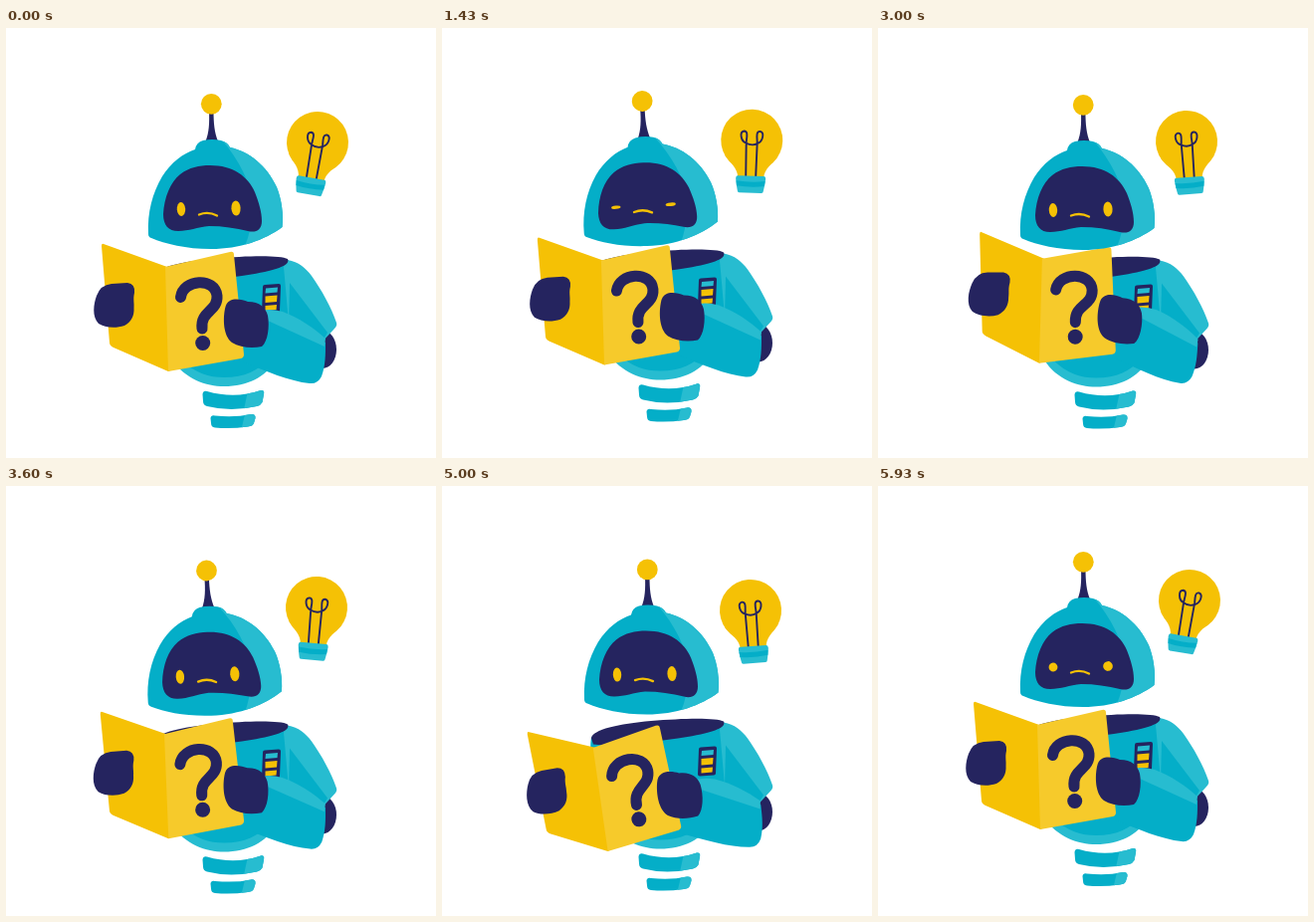
An HTML page with a canvas that plays this animation: 432x432 px, repeating every 6010 ms.

```html
<!DOCTYPE html>
<html lang="en">
<head>
<meta charset="utf-8">
<title>Robot reading</title>
<style>
html, body { margin: 0; width: 100%; height: 100%; overflow: hidden; background: #fff; }
canvas { display: block; width: 432px; height: 432px; }
</style>
</head>
<body>
<canvas id="stage" width="432" height="432"></canvas>
<script>
const ctx = document.getElementById('stage').getContext('2d');
const LOOP = 6010;
const TEAL = '#04aec8', LIGHT = '#27bcd0', NAVY = '#25245f';
const YELLOW = '#f5c105', PAGE = '#f6ca2b';

// Key poses as [seconds, value] pairs
const bodyY = [[0, 0], [2, -8], [4, 9], [6, 0]];
const headY = [[0, 0], [0.83, -0.3], [2.1, -6], [3, 1], [3.6, 8.5], [4, 9.5], [5, 7.6], [5.93, 0]];
const headTilt = [[0, 0], [0.75, -1.6], [2.1, -2.6], [2.95, 0], [3.6, -2], [4.6, 0]];
const armTilt = [[0, 0], [0.75, -3.7], [1.35, 0.3], [2, -3.6], [2.95, -3.3], [3.6, 0.7], [4.1, 0.4], [5, 6.5], [5.93, 0]];
const bulbY = [[0, 0], [0.83, 2], [2.1, -7], [3, -1], [3.6, 7], [4.2, 9.5], [5, 10], [5.93, 0]];
const eyeOpen = [[0, 1], [0.3, 1], [0.5, 0.28], [0.85, 0.28], [2.1, 0.18], [2.2, 0.18], [2.45, 1], [5.8, 1], [5.93, 0.65]];

function track(keys, t) {
  let i = 0;
  while (i < keys.length - 1 && keys[i + 1][0] <= t) i++;
  if (i === keys.length - 1) return keys[i][1];
  const [t0, a] = keys[i], [t1, b] = keys[i + 1];
  return a + (b - a) * (1 - Math.cos(Math.PI * (t - t0) / (t1 - t0))) / 2;
}

function fill(color, d) {
  ctx.fillStyle = color;
  ctx.fill(new Path2D(d));
}

function line(color, width, d) {
  ctx.strokeStyle = color;
  ctx.lineWidth = width;
  ctx.lineCap = ctx.lineJoin = 'round';
  ctx.stroke(new Path2D(d));
}

function oval(color, x, y, rx, ry = rx, turn = 0) {
  ctx.fillStyle = color;
  ctx.beginPath();
  ctx.ellipse(x, y, rx, ry, turn, 0, 7);
  ctx.fill();
}

function group(dx, dy, deg, px, py, draw) {
  ctx.save();
  ctx.translate(px + dx, py + dy);
  ctx.rotate(deg * Math.PI / 180);
  ctx.translate(-px, -py);
  draw();
  ctx.restore();
}

// Fills a shape, then a lighter area kept inside it
function shaded(d, light) {
  fill(TEAL, d);
  ctx.save();
  ctx.clip(new Path2D(d));
  fill(LIGHT, light);
  ctx.restore();
}

function drawBulb() {
  fill(YELLOW, 'M-27 15C-22 23-13 28-13 38H13C13 28 22 23 27 15Z');
  oval(YELLOW, 0, 0, 31);
  line(NAVY, 1.9, 'M-5 36L-5.5 2C-5-4-4-9-8-9C-13-8-11 1-6 3C-2 5 3 5 6 3C11 1 13-8 8-9C4-9 5-4 5.5 2L5 36');
  fill(LIGHT, 'M-13 36H13Q15 36 15 39L14 46L13 51Q13 53 11 53H-11Q-13 53-13 51L-14 46L-15 39Q-15 36-13 36Z');
  fill(TEAL, 'M-14.5 41Q0 43 14.5 41L14 46Q0 48-14 46Z');
}

function drawBase() {
  shaded('M197.5 368Q198 364 202 365Q230 373 256 364Q260 363.5 259 368L257.5 376Q256 379 252 380Q226 386 202 380Q198 379 198 375Z',
    'M244 360H262V388H238Z');
  shaded('M205.5 392Q206 388.5 210 389.5Q230 391.5 246 388Q251 387.5 250.5 392L249 397Q248 400 243 400.5Q226 403 210 401.5Q206 401 206 397Z',
    'M241 384H254V405H236Z');
}

function drawBody() {
  oval(NAVY, 318, 323, 14, 19);
  fill(LIGHT, 'M150 248C147 278 152 314 167 333C180 353 201 360 219 360C243 360 261 350 270 335L300 300L283 233Z');
  fill(TEAL, 'M150 248C147 278 158 312 176 333C190 347 204 351 219 351C240 351 254 344 264 332L290 300L279 238Z');
  // upper arm
  fill(LIGHT, 'M283 233C294 235 301 241 307 249C317 263 327 281 332 296Q333 299 330 302L318 315L284 296L279 240Z');
  fill(TEAL, 'M285 256L323 306L317 316L284 297Z');
  fill(NAVY, 'M150 249C151 240 178 234.5 210 231.5C243 228.5 276 228 283 232C287 240 263 245 237 249C205 253 175 258 152 255Z');
  // chest badge
  fill(NAVY, 'M260 258L274 257Q276 257 276 259L275 284Q275 286 273 286L259 287Q257 287 257 285L258 260Q258 258 260 258Z');
  fill(LIGHT, 'M261 261.5L273 260.5L272.5 265.5L260.5 266.5Z');
  fill(YELLOW, 'M260.5 269.5L272.5 268.5L272 275L260.5 276Z');
  fill(YELLOW, 'M260.5 279L272 278L271.5 283L260.5 284Z');
}

function drawArm() {
  fill(TEAL, 'M236 319L252 286L278 288L321 316C321 329 321 339 317 350Q313 358 305 357C285 355 262 345 234 334Z');
  fill(LIGHT, 'M252 285Q264 281 278 285C294 291 309 301 321 312L320 320L263 294Z');
  // book
  fill(YELLOW, 'M98 217L162 240L165 344L163 345L108 321Q104 319 104 316L96 219Q96 216 98 217Z');
  fill(PAGE, 'M160 240L225 225Q229 224 229 228L239 328Q239 331 236 332L163 345Z');
  line(NAVY, 11, 'M175.5 270.5C178 252 210 250 212 269C213 285 195 284 197 302');
  oval(NAVY, 197.7, 316.5, 7.5);
  // hands
  fill(NAVY, 'M106 257L122 256Q130 257 129 266C127.5 272 129 276 128.5 281C129 289 126 295 119 299C110 302 99 301 93 297C86 290 88 277 91 269Q95 258 106 257Z');
  fill(NAVY, 'M225 274C230 271 238 273 243 275C255 275 261 281 263 289C265 300 263 315 257 320C247 322 235 321 227 316C218 309 218 292 220 282Q221 276 225 274Z');
}

function arcs(phase) {
  if (phase >= 0.1 && phase < 0.9) line(YELLOW, 6, 'M189.5 62Q204 51 220 58');
  if (phase >= 0.3 && phase < 0.9) line(YELLOW, 8, 'M182 47Q201 34 225 41');
}

function drawHead(t) {
  fill(NAVY, 'M204 83H208.5C208.5 96 209.5 105 213 114H200.5C204 105 204.5 96 204 83Z');
  oval(YELLOW, 206.3, 76.3, 10.4);
  arcs(t % 2);
  shaded('M143 207C142 185 147 166 157 149C166 135 178 126 190 122Q191 115 198 113Q207 111 216 113Q223 115 225 120C244 124 262 138 272 160C277 172 279 188 277.5 200C260 213 235 222 206 222C181 222 160 217 146 211Q143 210 143 207Z',
    'M211 106C232 128 246 154 248 178Q248 202 238 224L290 224V106Z');
  fill(NAVY, 'M205 138C228 138 243 149 250 165C254 175 257 185 257 194C257 203 251 206 243 204C231 201 218 199 204 199C192 200 184 204 173 204C163 204 158 198 158 187C159 170 165 155 175 147C184 140 194 138 205 138Z');
  const open = track(eyeOpen, t);
  const wide = 4.2 + (1 - open) * 0.7;
  oval(YELLOW, 176, 182, wide, 7 * open, -0.05);
  oval(YELLOW, 231, 181, wide + 0.4, 7.5 * open, -0.05);
  line(YELLOW, 2.3, 'M194 187.5Q203 184 212 188.5');
}

function draw(ms) {
  // Twenty poses a second, on a 30 / 70 ms beat
  const step = Math.min(119, 2 * Math.floor(ms / 100) + (ms % 100 >= 30 ? 1 : 0));
  const t = step / 20;
  const swing = Math.cos(Math.PI * t);
  ctx.fillStyle = '#fff';
  ctx.fillRect(0, 0, 432, 432);
  group(311.5 + 1.5 * swing, 115 + track(bulbY, t), 2.75 + 7 * swing, 0, 0, drawBulb);
  group(0, track(bodyY, t), 0, 0, 0, () => {
    drawBase();
    drawBody();
    group(0, 0, -track(armTilt, t), 319, 322, drawArm);
  });
  group(0, track(headY, t), track(headTilt, t), 210, 215, () => drawHead(t));
}

const start = performance.now();
function tick() {
  draw((performance.now() - start) % LOOP);
  requestAnimationFrame(tick);
}
tick();
</script>
</body>
</html>
```
